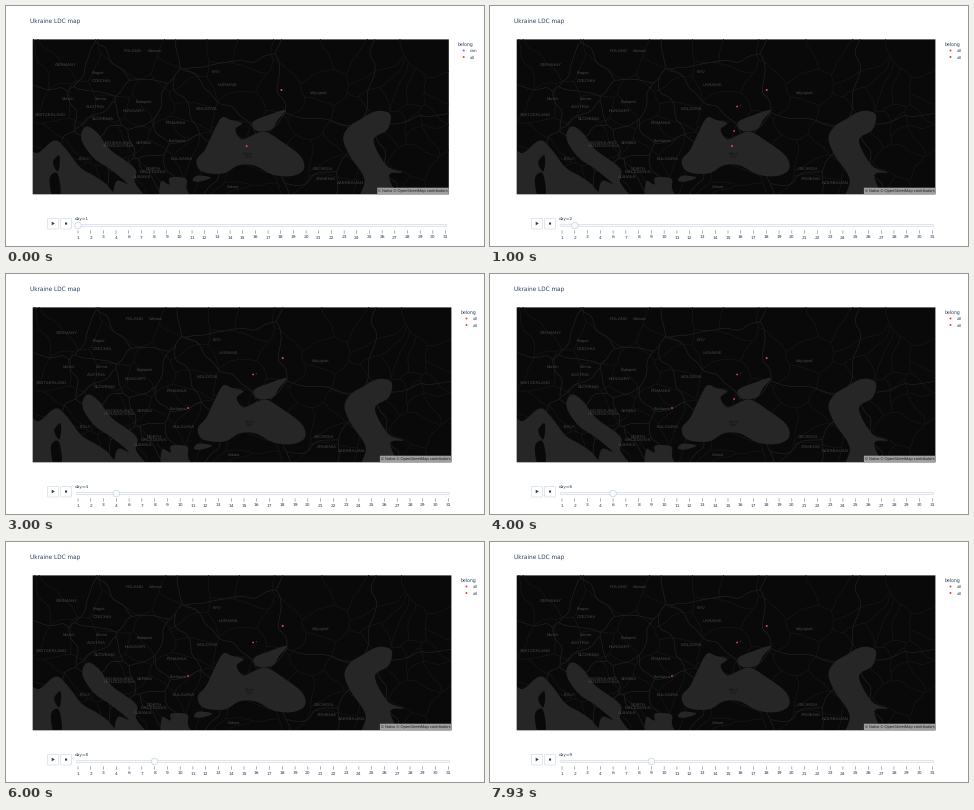
Write a matplotlib script that moves like this. It is 478x240 px and loops after 8 s.

```python
import numpy as np
import matplotlib.pyplot as plt
from matplotlib.animation import FuncAnimation
from matplotlib.collections import LineCollection
from matplotlib.patches import Circle, FancyBboxPatch, Polygon, Rectangle

W, H, DPI = 478, 240, 64
PT = 72 / DPI
INK, EDGE, BLUE, RED = "#2a3f5f", "#c6cedb", "#636efa", "#e8454a"
LAND, WATER, BORDER, PROVINCE = "#090909", "#262626", "#1f1f1f", "#151515"
DAYS = [d for d in range(1, 32) if d != 5]

plt.rcParams.update({"font.family": "DejaVu Sans", "text.hinting": "none"})

# Key points of the coasts as (lon, lat), smoothed below
SEAS = {
    "black": [(27.5, 42.5), (28.6, 43.5), (29.6, 45), (30.8, 46.5), (32, 46.3), (33.5, 46),
              (32.6, 45.4), (33.5, 44.5), (35.2, 45), (36.6, 45.2), (38.7, 44.3),
              (41.2, 42.9), (41.6, 41.6), (40, 40.95), (37.5, 41.1), (35.1, 42), (33, 42),
              (31, 41.2), (28.2, 41.4)],
    "azov": [(34.9, 46.1), (36.8, 46.7), (39.2, 47.2), (38.2, 46.3), (37.3, 45.4),
             (35.4, 45.3)],
    "caspian": [(47.6, 45.7), (46.8, 44.6), (47.6, 43), (49.6, 40.6), (48.9, 38), (53.9, 38),
                (52.8, 41), (54.6, 41.3), (52.5, 42), (50.8, 44.4), (52.6, 45.4), (53, 46.8),
                (51.2, 47.1), (49.2, 46.4)],
    "tyrrhenian": [(5, 43.4), (6.6, 43.2), (8.8, 44.4), (10.3, 43.6), (12.2, 41.8),
                   (14.2, 40.9), (16, 39.8), (16.2, 38.3), (5, 38.3)],
    "adriatic": [(12.4, 45.2), (12.5, 44.2), (14, 42.7), (16, 41.7), (18.4, 40.2),
                 (17.1, 40.5), (16.6, 39.6), (16.8, 38.3), (21, 38.3), (19.4, 40.3),
                 (19.4, 41.7), (16.2, 43.5), (14.6, 45), (13.2, 45.7)],
    "aegean": [(23, 38.3), (22.8, 40.4), (23.9, 40.1), (24, 40.8), (26.1, 40.7),
               (26.2, 39.6), (26.9, 38.3)],
    "marmara": [(27, 40.5), (27.6, 41), (29.4, 40.8), (28, 40.4)]}
ISLANDS = {
    "corsica": [(9.4, 43), (8.6, 42.3), (9.2, 41.4), (9.5, 42.1)],
    "sardinia": [(9.2, 41.2), (8.2, 40.8), (8.5, 39), (9.6, 39.2)]}

COUNTRIES = [
    ("GERMANY", 60, 58), ("POLAND", 127, 44), ("CZECHIA", 95, 74), ("AUSTRIA", 89, 100),
    ("HUNGARY", 128, 104), ("SWITZERLAND", 44, 108.5), ("SLOVENIA", 97, 113),
    ("ROMANIA", 170, 117), ("MOLDOVA", 200, 103), ("UKRAINE", 221, 78),
    ("SERBIA", 138, 137), ("BOSNIA AND\nHERZEGOVINA", 112, 138), ("ITALY", 78, 153),
    ("BULGARIA", 176, 153), ("NORTH\nMACEDONIA", 147, 164), ("ALBANIA", 136, 171),
    ("GEORGIA", 317, 163), ("ARMENIA", 320, 173), ("AZERBAIJAN", 344, 176)]
CITIES = [
    ("KYIV", 210, 66), ("Warsaw", 149, 44), ("Prague", 92, 67), ("Munich", 62, 93),
    ("Vienna", 95, 93), ("Budapest", 138, 96), ("Bucharest", 171, 134),
    ("Volgograd", 313, 86.5), ("Ankara", 227, 181)]

# Plotted points: x, y, colour, radius
LUHANSK = (275.4, 84, RED, 1.0)
BASE = [LUHANSK, (245.8, 100.5, RED, 0.9), (249, 99.8, RED, 0.4)]
BUCHAREST = (180.7, 134, RED, 0.9)
CRIMEA = (242.8, 125, RED, 0.9)
SEA_RED, SEA_BLUE = [(240.7, 140, c, 1.0) for c in (RED, BLUE)]
LVIV = (165, 73.7, BLUE, 1.1)
ZHYTOMYR = (200.5, 68.3, RED, 0.7)

# One step per second: day, wide layout, points
STEPS = [
    (1, False, [LUHANSK, SEA_RED]),
    (2, True, BASE + [CRIMEA, SEA_RED]),
    (3, False, BASE + [BUCHAREST, LVIV, SEA_BLUE]),
    (4, True, BASE + [BUCHAREST]),
    (6, True, BASE + [BUCHAREST, CRIMEA]),
    (7, False, BASE + [BUCHAREST, ZHYTOMYR]),
    (8, True, BASE + [BUCHAREST]),
    (9, True, BASE + [BUCHAREST])]


def project(points):
    """Mercator, in stage pixels."""
    lon, lat = np.array(points, float).T
    merc = np.arcsinh(np.tan(np.radians(lat)))
    return np.column_stack([243.7 + (lon - 34.5) * 7.6, 511.4 - 435 * merc])


def smooth(p, n=6):
    """Closed Catmull-Rom curve through p."""
    a, b, c, d = (np.roll(p, k, axis=0)[:, None] for k in (1, 0, -1, -2))
    t = np.linspace(0, 1, n, endpoint=False)[None, :, None]
    curve = b + t / 2 * (c - a + t * (2 * a - 5 * b + 4 * c - d + t * (3 * (b - c) + d - a)))
    return curve.reshape(-1, 2)


def cell_edges(sites, wobble):
    """Borders halfway between neighbouring sites, bent by a few waves."""
    gx, gy = np.meshgrid(np.arange(26, 448, 2.0), np.arange(32, 192, 2.0))
    wx = gx + wobble * (np.sin(gy / 6) + np.sin(gx / 4 + gy / 9))
    wy = gy + wobble * (np.sin(gx / 7) + np.sin(gy / 4 - gx / 11))
    dist = np.array([np.hypot(wx - x, wy - y) for x, y in sites])
    edges = []
    for i, d in enumerate(dist):
        gap = d - np.delete(dist, i, axis=0).min(axis=0)
        edges += ax.contour(gx, gy, gap, levels=[0]).allsegs[0]
    return edges


fig = plt.figure(figsize=(W / DPI, H / DPI), dpi=DPI, facecolor="white")
ax = fig.add_axes([0, 0, 1, 1])

rng = np.random.default_rng(4)
SEA_PX = [smooth(project(s)) for s in SEAS.values()]
ISLAND_PX = [smooth(project(s)) for s in ISLANDS.values()]
UNNAMED = [(215, 36), (325, 65), (405, 75), (420, 150), (240, 195)]
BORDER_PX = cell_edges([c[1:] for c in COUNTRIES] + UNNAMED, 2)
PROVINCE_PX = cell_edges(rng.uniform((27, 33), (445, 188), (75, 2)), 1.5)


def text(x, y, s, size=4.3, color=INK, ha="left", va="center_baseline", **kw):
    return ax.text(x, y, s, fontsize=size * PT, color=color, ha=ha, va=va, **kw)


def rounded(x, y, w, h, fc):
    ax.add_patch(FancyBboxPatch((x, y), w, h, fc=fc, ec=EDGE, lw=0.5 * PT,
                                boxstyle="round,pad=0,rounding_size=0.8"))


def draw_map(wide, points):
    dx, right = (1.3, 445.4) if wide else (0, 442.8)
    frame = Rectangle((26.7, 33.4), right - 26.7, 154.9, fc=LAND, ec="none", snap=False)
    ax.add_patch(frame)

    def put(artist):
        artist.set_clip_path(frame)

    for edges, color in ((PROVINCE_PX, PROVINCE), (BORDER_PX, BORDER)):
        put(ax.add_collection(LineCollection([e + (dx, 0) for e in edges], colors=color,
                                             linewidths=0.5 * PT, zorder=1)))
    for shapes, color in ((SEA_PX, WATER), (ISLAND_PX, LAND)):
        for pts in shapes:
            put(ax.add_patch(Polygon(pts + (dx, 0), fc=color, ec="none", zorder=2)))

    sans = dict(ha="center", family="Liberation Sans", linespacing=0.95)
    for names, size in ((COUNTRIES, 4.4), (CITIES, 3.9)):
        for name, x, y in names:
            put(text(x + dx, y, name, size, "#464646", **sans))
    put(text(242 + dx, 149, "Black\nSea", 4, "#141414", **sans))

    for x, y, color, r in points:
        put(ax.add_patch(Circle((x + dx, y), r, fc=color, ec="none", zorder=3)))

    ax.add_patch(Rectangle((right - 71.5, 181.7), 71.5, 6.5, fc="#a0a0a0", ec="none",
                           zorder=3, snap=False))
    text(right - 1, 184.9, "© Nalvo © OpenStreetMap contributors", 3.95, "#1c1c1c",
         ha="right", family="Liberation Sans", zorder=4)


def draw_legend(wide):
    dx = 2.8 if wide else 0
    text(452 + dx, 37.6, "belong", 4.6)
    rows = [("all", RED), ("all", RED)] if wide else [("can", BLUE), ("all", RED)]
    for i, (name, color) in enumerate(rows):
        y = 44.5 + 6.5 * i
        ax.add_patch(Circle((457.7 + dx, y), 1, fc=color, ec="none"))
        text(464.2 + dx, y, name)


def draw_controls(day, wide):
    for x in (41.5, 54.5):
        rounded(x, 212.5, 11, 10.5, "white")
    ax.add_patch(Polygon([(45.7, 215.7), (45.7, 219.3), (48.8, 217.5)], fc=INK, ec="none"))
    ax.add_patch(Rectangle((59, 216.5), 2.1, 2.1, fc=INK, ec="none", snap=False))

    end = 442.3 if wide else 439.5
    rounded(70.4, 218.6, end - 69, 1.8, "#f8fafc")
    xs = np.linspace(72, end, len(DAYS))
    for x, d in zip(xs, DAYS):
        ax.plot([x, x], [224.6, 227.4], color="#666666", lw=0.5 * PT, snap=False)
        text(x, 231.5, str(d), 4.4, ha="center")
    ax.add_patch(Circle((xs[DAYS.index(day)], 219.5), 3.3, fc="#f8fafc", ec=EDGE,
                        lw=0.6 * PT, zorder=3))
    text(69, 212, f"day={day}")


def draw(i):
    day, wide, points = STEPS[i]
    ax.clear()
    ax.set(xlim=(0, W), ylim=(H, 0))
    ax.axis("off")
    text(24, 14.8, "Ukraine LDC map", 5.8)
    draw_map(wide, points)
    draw_legend(wide)
    draw_controls(day, wide)
    return []


anim = FuncAnimation(fig, draw, frames=len(STEPS), interval=1000, repeat=True,
                     repeat_delay=0, blit=False)
plt.show()
```
